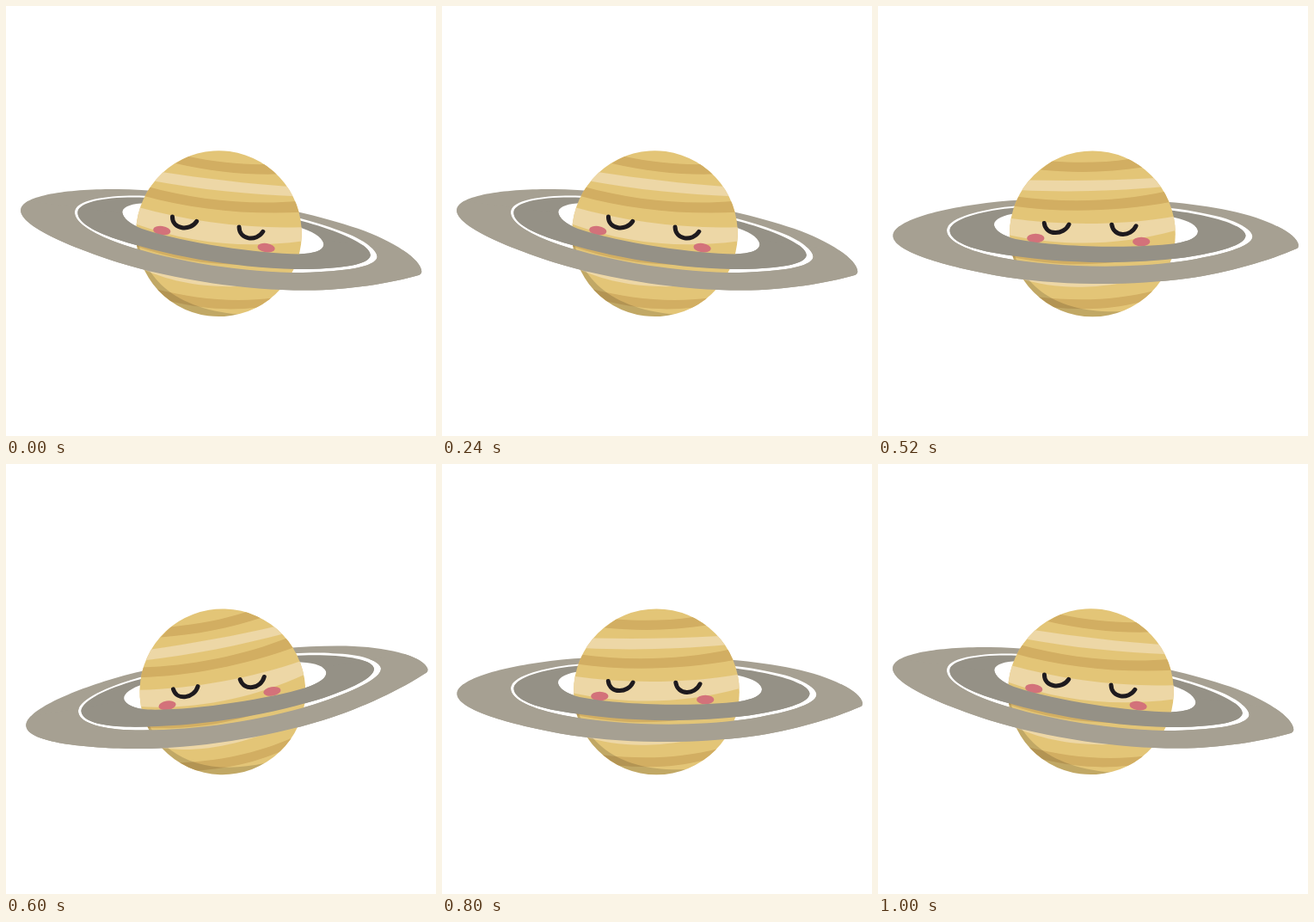
Animation, 500 px wide and 500 px high, one loop 1100 ms. Source, as an HTML page:

```html
<!DOCTYPE html>
<html lang="en">
<head>
<meta charset="utf-8">
<title>Sleeping ringed planet</title>
<style>
  html, body { margin: 0; height: 100%; overflow: hidden; background: #fff; }
  svg { display: block; width: 100%; height: 100%; }
  .dark { fill: #d2ae62; }
  .light { fill: #edd7a6; }
</style>
</head>
<body>
<svg viewBox="0 0 500 500">
  <defs>
    <clipPath id="disc"><circle cx="249.4" cy="264.9" r="96.4"/></clipPath>
    <clipPath id="front"><rect y="256" width="500" height="244"/></clipPath>
    <g id="rings" fill-rule="evenodd">
      <path fill="#a6a092" d="M17.5 267C18 250 70 236 126 229C160 224.5 205 224 250 224C310 224 365 229 409 238
        C452 247 487 264 489 278Q489 281 487 282C455 296 408 310 359.6 316.8C325 321.5 285 323.5 250 323
        C210 322.5 170 319 138 313.4C70 301 17 284 17.5 267Z
        M80 261C80 248 112 238.5 147 233.8C200 227 320 227 383 242C415 248 435 259 435.5 268
        C435 280 400 289.5 352 297.1C285 306 205 304 141.6 292.2C105 285 80 274 80 261Z"/>
      <path fill="#959186" d="M83.5 261C83.5 250 110 240.5 147 235.8C200 229 315 230 375 243C405 249 427 258 427.5 267
        C427 278 398 286 356.4 292.5C285 301.5 205 300 132 286.6C103 281 83.5 272 83.5 261Z
        M135 254C135 248 146 243 160 241C210 235 300 235 345 246C362 249.5 372 256 372 262
        C372 269 362 273.5 345 276.3C300 282 210 281 160 271C146 267.5 135 261 135 254Z"/>
    </g>
  </defs>
  <g id="planet">
    <use href="#rings"/>
    <circle cx="249.4" cy="264.9" r="96.4" fill="#e3c577"/>
    <g clip-path="url(#disc)">
      <path class="dark" d="M202 180.5C235 183 265 182 292 178L308 187.5C270 193.5 230 194.5 189 190.5Z"/>
      <path class="light" d="M174 202.5C225 203.5 275 203 323 200L333 210C280 215 220 217 165 214Z"/>
      <path class="dark" d="M161 221.5C215 229 280 228 337 215L342 227.5C280 239 215 241 156 232.5Z"/>
      <path class="light" d="M151 246.5C215 256 285 255 346 244.5L348 260.5C280 279 215 280 151 266Z"/>
      <path class="dark" d="M151 282C215 290 285 289 347 277L343 285C275 303 215 305 154 291.5Z"/>
      <path class="light" d="M158 302C210 316 270 316 342 300L335 311C255 332 210 330 165 317Z"/>
      <path class="dark" d="M184 338C230 343.5 275 343 323 330.5L306 344C270 353 240 354 200 350Z"/>
      <path opacity=".15" d="M152 262C160 322 203 359 286 355L300 400H100V262Z"/>
    </g>
    <g fill="#d3727a">
      <ellipse cx="183.3" cy="270" rx="10.2" ry="5.2"/>
      <ellipse cx="306.2" cy="274" rx="10.2" ry="5.2"/>
    </g>
    <path fill="none" stroke="#1e1a1e" stroke-width="5" stroke-linecap="round"
      d="M193.3 252.5C195 267 216 267 222 254M271.8 254.2C274 269 294 269 300 255.8"/>
    <use href="#rings" clip-path="url(#front)"/>
  </g>
</svg>
<script>
  const LOOP = 1100;
  const planet = document.getElementById('planet');

  // The planet snaps between three tilts, with no easing.
  function tilt(t) {
    if (t < 400 || t >= 1000) return 7.5;
    return t >= 600 && t < 800 ? -9.5 : 0;
  }

  function draw() {
    planet.setAttribute('transform', `rotate(${tilt(performance.now() % LOOP)} 250 250)`);
    requestAnimationFrame(draw);
  }
  draw();
</script>
</body>
</html>
```
